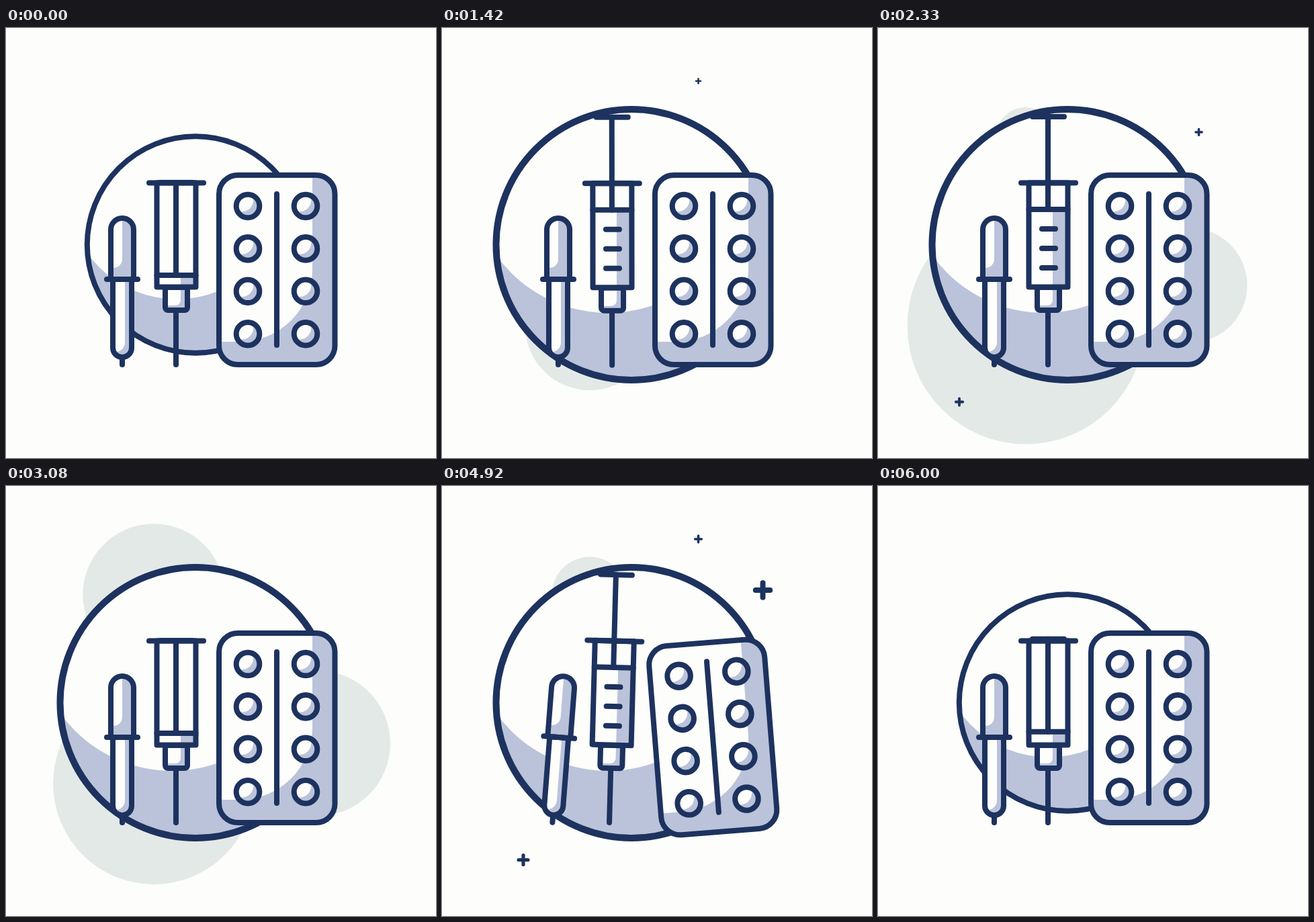
An HTML page with a canvas for the animation above (6.08 s loop, 640 by 640 pixels).

```html
<!DOCTYPE html>
<html lang="en">
<head>
<meta charset="utf-8">
<title>Medicine</title>
<style>
html, body { margin: 0; width: 100%; height: 100%; overflow: hidden; background: #fdfdfb; }
canvas { display: block; width: 640px; height: 640px; }
</style>
</head>
<body>
<canvas id="stage" width="640" height="640"></canvas>
<script>
const ctx = document.getElementById('stage').getContext('2d');
const INK = '#1d325e', PAPER = '#fdfdfb', SHADE = '#bac3da', BLOB = '#e3e9e6';
const LOOP = 6080, CYCLE = 3090, STEP = LOOP / 73;

const progress = (t, start, span) => Math.min(1, Math.max(0, (t - start) / span));

// Eased change from 0 to 1.
function ramp(t, start, span) {
  const u = progress(t, start, span);
  return u * u * (3 - 2 * u);
}

// Rise from 0 to 1 and back: pulse starts briskly, hump starts gently.
const pulse = (t, start, span) => Math.sin(Math.PI * progress(t, start, span));
const hump = (t, start, span) => pulse(t, start, span) ** 2;

function circlePath(x, y, r) {
  const path = new Path2D();
  path.arc(x, y, r, 0, Math.PI * 2);
  return path;
}

function boxPath(left, top, right, bottom, radii = 0) {
  const path = new Path2D();
  path.roundRect(left, top, right - left, bottom - top, radii);
  return path;
}

function blob(x, y, r) {
  ctx.fillStyle = BLOB;
  ctx.fill(circlePath(x, y, r));
}

// Shaded shape with a paper-coloured lit area and an outline.
function shaded(shape, lit, width = 8) {
  ctx.save();
  ctx.clip(shape);
  ctx.fillStyle = SHADE;
  ctx.fill(shape);
  ctx.fillStyle = PAPER;
  ctx.fill(lit);
  ctx.restore();
  ctx.lineWidth = width;
  ctx.stroke(shape);
}

function line(x1, y1, x2, y2, width = 8) {
  ctx.lineWidth = width;
  ctx.beginPath();
  ctx.moveTo(x1, y1);
  ctx.lineTo(x2, y2);
  ctx.stroke();
}

function posed(x, y, dy, degrees, scale, draw) {
  ctx.save();
  ctx.translate(x, y + dy);
  ctx.rotate(degrees * Math.PI / 180);
  ctx.scale(scale, scale);
  ctx.translate(-x, -y);
  draw();
  ctx.restore();
}

function star(x, y, r) {
  if (r < 0.5) return;
  const arm = r * 0.73, width = r * 0.54;
  line(x - arm, y, x + arm, y, width);
  line(x, y - arm, x, y + arm, width);
}

function drawDropper() {
  line(173, 490, 173, 501);
  shaded(boxPath(159, 374, 187, 490, [0, 0, 14, 14]),
         boxPath(140, 374, 177, 482, [0, 0, 14, 0]));
  shaded(boxPath(156, 283, 190, 374, [17, 17, 0, 0]),
         boxPath(140, 270, 173, 357, [0, 0, 13, 0]));
  line(150, 374, 196, 374);
}

function drawSyringe(travel) {
  const piston = 270 + travel, handle = piston - 138;
  line(253, 420, 253, 501);
  shaded(boxPath(237, 386, 270, 420, 4), boxPath(230, 380, 260, 413, [0, 0, 8, 0]));

  const barrel = boxPath(224.5, 230.5, 282.5, 385.5);
  ctx.fillStyle = PAPER;
  ctx.fill(barrel);
  ctx.save();
  ctx.beginPath();
  ctx.rect(224, piston, 59, 386 - piston);
  ctx.clip();
  ctx.fillStyle = SHADE;
  ctx.fillRect(260, piston, 23, 386 - piston);
  for (let i = 0; i < 3; i++) line(244, 299 + i * 29, 264, 299 + i * 29);
  ctx.restore();

  ctx.lineWidth = 8;
  ctx.stroke(barrel);
  line(224.5, piston, 282.5, piston);
  line(253, piston, 253, handle);
  line(230, handle, 277, handle);
  line(213, 230.5, 294, 230.5);
}

function drawBlister() {
  shaded(boxPath(317, 219, 489.5, 501, 28),
         boxPath(300, 200, 456, 467, [0, 0, 108, 0]));
  line(403, 247, 403, 472);
  for (let i = 0; i < 8; i++) {
    const x = 360 + 86 * (i % 2), y = 265 + 63.4 * Math.floor(i / 2);
    shaded(circlePath(x, y, 17.3), circlePath(x - 9, y - 9, 17.3));
  }
}

function draw(t) {
  const phase = t % CYCLE;
  ctx.fillStyle = PAPER;
  ctx.fillRect(0, 0, 640, 640);
  ctx.strokeStyle = INK;
  ctx.lineCap = ctx.lineJoin = 'round';

  blob(220, 443, 178 * pulse(t, 810, 3334));
  blob(464, 383, 108 * pulse(t, 1300, 3550));
  blob(220, 162, 123 * pulse(t, 1920, 3530));

  star(114, 111, 20 * pulse(phase, 856, 330));
  star(381.5, 79, 20 * pulse(phase, 1378, 500));
  star(477.5, 155, 20 * pulse(phase, 1614, 800));
  star(121, 556.5, 20 * pulse(phase, 1713, 700));

  const size = 0.8 + 0.2 * (ramp(t, 0, 1000) - ramp(t, 5050, 590));
  posed(282, 322.5, 0, 0, size, () =>
    shaded(circlePath(282, 322.5, 201.5), circlePath(247, 220, 204), 10));

  const travel = 98 * (1 - ramp(phase, 40, 660) + ramp(phase, 2330, 635));
  const shake = 1.55 * hump(phase, 1350, 1000);
  const syringeTilt = -shake * Math.cos(2 * Math.PI * (t - 1830) / 412);
  posed(253, 353, 13 * hump(phase, 860, 600), syringeTilt, 1, () => drawSyringe(travel));

  const dropperTilt = 4.5 * hump(phase, 1400, 900) - 1.9 * hump(phase, 1010, 300);
  posed(173, 390, 58 * hump(phase, 800, 500), dropperTilt, 1, drawDropper);

  // The second bounce is half as deep as the first.
  const drop = 28 / (1 + Math.floor(t / CYCLE));
  const blisterTilt = -4.6 * (hump(phase, 80, 620) + hump(phase, 1400, 900));
  posed(403, 360, drop * hump(phase, 1430, 800), blisterTilt, 1, drawBlister);
}

function tick() {
  const t = performance.now() % LOOP;
  draw(Math.floor(t / STEP + 0.05) * STEP);
  requestAnimationFrame(tick);
}
tick();
</script>
</body>
</html>
```
